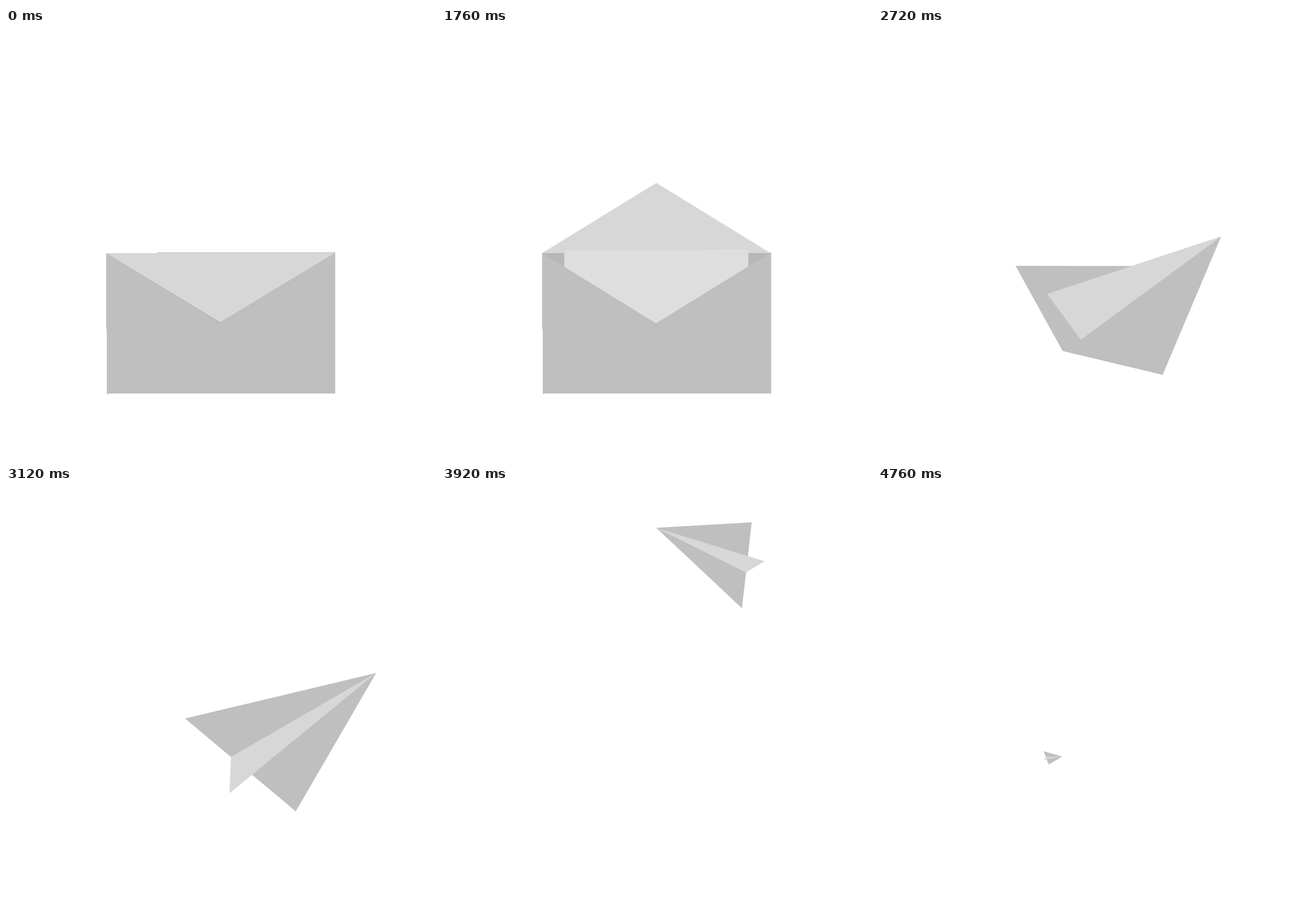
Recreate the animation shown at these times as an HTML page with a canvas. Size 640 by 640 pixels, loop 4.8 s.

```html
<!DOCTYPE html>
<html lang="en">
<head>
<meta charset="utf-8">
<title>Envelope to paper plane</title>
<style>
  html, body { margin: 0; width: 100%; height: 100%; overflow: hidden; background: #fff; }
  canvas { display: block; width: 640px; height: 640px; }
</style>
</head>
<body>
<canvas id="stage" width="640" height="640"></canvas>
<script>
const ctx = document.getElementById('stage').getContext('2d');
const BODY = '#bfbfbf', FLAP = '#d7d7d7', INSIDE = '#b7b7b7', PAPER = '#dedede';
const LOOP = 4800, STEP = 40;
const OPEN = 160, LETTER = 1480, FOLD = 2000, HALF = 2320, FLY = 3120, END = 4760;

const mix = (a, b, u) => a + (b - a) * u;
const span = (t, from, to) => Math.min(1, Math.max(0, (t - from) / (to - from)));
const smooth = u => u * u * (3 - 2 * u);
const swing = (t, middle, width) => 1 / (1 + Math.exp((middle - t) / width));
const rad = deg => deg * Math.PI / 180;

// left wing, top fold, nose, right wing, lower corner, keel top, keel bottom
const closed = [[150, 335], [319, 437], [490, 334], [490, 544], [150, 544], [150, 335], [319, 438]];
const half = [[167, 359], [360, 380], [486, 330], [419, 536], [219, 512], [201, 391], [283, 468]];
// the same points as a plane: ahead and to the left of the wing centre, nose at 1
const plane = [[-0.121, 0.424], [0.439, 0.212], [1, 0], [0.121, -0.424], [0.025, -0.09],
  [-0.021, 0.072], [-0.152, -0.106]];

function shape(color, ...pts) {
  ctx.fillStyle = color;
  ctx.beginPath();
  pts.forEach(([x, y]) => ctx.lineTo(x, y));
  ctx.fill();
}

function drawEnvelope(t) {
  const open = t < OPEN ? 0 : swing(t, 551, 100) - swing(t, 1870, 18);
  const tip = mix(438, 230, open);
  const flap = () => shape(FLAP, [149, 335], [489, 335], [319, tip]);
  shape(BODY, [225, 334], [490, 334], [490, 336], [225, 336]);
  shape(INSIDE, [149, 335], [489, 335], [489, 442], [150, 442]);
  if (tip < 335) flap();
  if (t >= LETTER) {
    const y = mix(141, 347, smooth(span(t, LETTER, 1820)));
    ctx.globalAlpha = span(t, LETTER - 40, LETTER + 80);
    shape(PAPER, [182, y + 1], [456, y], [456, y + 194], [182, y + 194]);
    ctx.globalAlpha = 1;
  }
  shape(BODY, [149, 335], [318.5, 439.5], [488, 335], [490, 334], [490, 544],
    [152, 544], [151, 545], [150, 545], [150, 448], [149, 448]);
  if (tip >= 335) flap();
}

// One shrinking lap around an ellipse, turning left all the way
function planeAt(t) {
  const u = span(t, FLY, END);
  const turn = 233 * u + 103 * u ** 3;
  const orbit = rad(76.1 - turn), heading = rad(-34.1 - 0.983 * turn);
  const reach = 1.009 + 0.187 * u - 0.264 * u * u;
  const size = 244 - 183 * u - 37 * u * u;
  const x = 290 + 243 * reach * Math.cos(orbit);
  const y = 250.5 + 168 * reach * Math.sin(orbit);
  const c = size * Math.cos(heading), s = size * Math.sin(heading);
  return plane.map(([f, l]) => [x + c * f + s * l, y + s * f - c * l]);
}

function blend(from, to, u) {
  return from.map(([x, y], i) => [mix(x, to[i][0], u), mix(y, to[i][1], u)]);
}

function sheetAt(t) {
  if (t < HALF) return blend(closed, half, smooth(span(t, FOLD - STEP / 2, HALF)));
  if (t < FLY) return blend(half, planeAt(FLY), span(t, HALF, FLY) ** 1.4);
  return planeAt(t);
}

function drawSheet([left, top, nose, right, corner, keel, tail]) {
  shape(BODY, left, top, nose, right, corner);
  shape(FLAP, keel, nose, tail);
}

function draw(t) {
  ctx.clearRect(0, 0, 640, 640);
  if (t < FOLD) drawEnvelope(t);
  else drawSheet(sheetAt(t));
}

const start = performance.now();
function tick() {
  const t = (performance.now() - start) % LOOP;
  draw(Math.floor(t / STEP) * STEP);
  requestAnimationFrame(tick);
}
tick();
</script>
</body>
</html>
```
